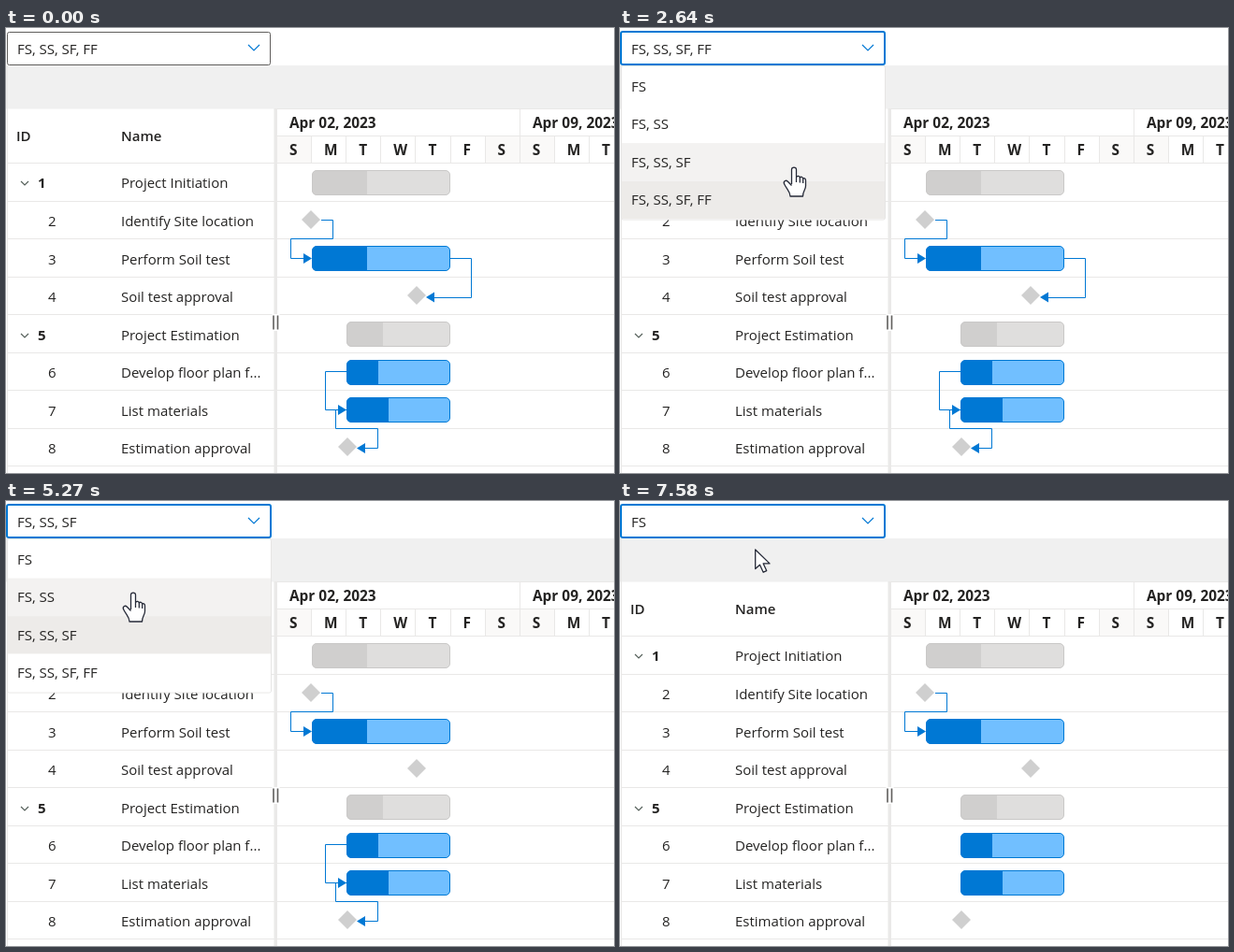
Write an HTML page that moves like this. It is 650 by 476 pixels and loops after 8000 ms.

```html
<!DOCTYPE html>
<html lang="en">
<head>
<meta charset="utf-8">
<title>Gantt dependency types</title>
<style>
  html, body { margin: 0; width: 100%; height: 100%; overflow: hidden; background: #fff; }
  svg { display: block; width: 650px; height: 476px; }
  text { font: 15px "Open Sans", "Noto Sans", sans-serif; fill: #242322; white-space: pre; }
  .head { font-weight: 600; }
  .date { font-weight: 700; font-size: 15.4px; }
  .bold { font-weight: 700; }
  .line { fill: none; stroke: #e9e8e7; }
  .link { fill: none; stroke: #0078d4; }
  .chevron { fill: none; stroke: #55605a; stroke-width: 1.2; }
  .pointer { fill: #fff; stroke: #262a38; stroke-width: 1.3; stroke-linejoin: round; }
  #click { fill: #fcf472; mix-blend-mode: multiply; }
</style>
</head>
<body>
<svg id="stage" viewBox="0 0 650 476"></svg>
<script>
const LOOP = 8000, ROW = 40.55, TOP = 144, DAY = 37.1, CHART = 290;
const OPTIONS = ['FS', 'FS, SS', 'FS, SS, SF', 'FS, SS, SF, FF'];
const TASKS = [
  ['1', 'Project Initiation'], ['2', 'Identify Site location'],
  ['3', 'Perform Soil test'], ['4', 'Soil test approval'],
  ['5', 'Project Estimation'], ['6', 'Develop floor plan f...'],
  ['7', 'List materials'], ['8', 'Estimation approval']
];

const text = (x, y, s, cls = '') => `<text x="${x}" y="${y}" class="${cls}">${s}</text>`;
const rect = (x, y, w, h, fill, more = '') =>
  `<rect x="${x}" y="${y}" width="${w}" height="${h}" fill="${fill}" ${more}/>`;
const path = (d, cls, more = '') => `<path d="${d}" class="${cls}" ${more}/>`;
const rowY = (i, offset = 0) => Math.round(TOP + i * ROW + offset);
const rowLine = i => path(`M1 ${rowY(i) + 0.5}H650`, 'line');

function bar(row, x, progress, parent) {
  const y = rowY(row, 7.95) + 0.5, left = x + 0.5, w = 474.5 - left;
  const [back, done, edge] = parent
    ? ['#dfdedd', '#d0cfce', '#c9c8c7'] : ['#71bfff', '#0078d4', '#0078d4'];
  return rect(left, y, w, 26, back, 'rx="4.5"') +
    path(`M${progress} ${y}H${left + 4.5}q-4.5 0-4.5 4.5v17q0 4.5 4.5 4.5H${progress}z`, '', `fill="${done}"`) +
    rect(left, y, w, 26, 'none', `rx="4.5" stroke="${edge}"`);
}

const diamond = (x, y) => path(`M${x} ${y - 10}l10 10-10 10-10-10z`, '', 'fill="#cfcfcf"');

// dir is 1 for an arrow pointing right, -1 for left
const link = (id, d, x, y, dir) => `<g id="${id}">${path(d, 'link')}
  ${path(`M${x} ${y}l${-9 * dir}-5.5v11z`, '', 'fill="#0078d4"')}</g>`;

function grid() {
  let s = rect(0, 40, 650, 46.5, '#f0f0f0') + path('M1.5 40V476', 'line');
  s += text(11, 121, 'ID', 'head') + text(123, 121, 'Name', 'head');
  TASKS.forEach(([id, name], i) => {
    const y = rowY(i, 27.45), parent = id === '1' || id === '5';
    s += rowLine(i);
    if (parent) s += path(`M16 ${y - 7}l4 4 4-4`, 'chevron');
    s += text(parent ? 34 : 45, y, id, parent ? 'bold' : '') + text(123, y, name);
  });
  return s + rowLine(TASKS.length);
}

function chart() {
  let s = '';
  [...'SMTWTFSSMT'].forEach((day, i) => {
    const x = CHART + i * DAY;
    if (day === 'S') s += rect(x, 116, DAY, 28, '#faf9f8');
    if (i) s += path(`M${Math.round(x) - 0.5} 115V144`, 'line');
    s += text(x + 13, 136, day, 'date');
  });
  s += path('M290 86.5H650M290 115.5H650M549.5 86V115', 'line');
  s += text(303, 107, 'Apr 02, 2023', 'date') + text(563, 107, 'Apr 09, 2023', 'date');
  s += bar(0, 327, 386, true) + bar(2, 327, 386) + bar(4, 364, 403, true) +
    bar(5, 364, 398) + bar(6, 364, 409);
  s += diamond(326, 205) + diamond(439, 286) + diamond(365, 448);
  s += link('fs', 'M337 205.5H349.5V225.5H304.5V246.5H319', 327, 246.5, 1);
  s += link('ss', 'M364 367.5H341.5V408.5H356', 364, 408.5, 1);
  s += link('sf', 'M364 408.5H352.5V428.5H397.5V449.5H383', 375, 449.5, -1);
  s += link('ff', 'M475 246.5H497.5V288.5H457', 449, 288, -1);
  s += rect(286.5, 86, 3.5, 390, '#eae9e8') + rect(284.5, 306, 8, 18, '#fff');
  return s + path('M286 307.5V322.5M290.5 307.5V322.5', '', 'stroke="#605e5c" stroke-width="1.6"');
}

function dropdown() {
  const items = OPTIONS.map((name, i) =>
    rect(2, 42 + i * ROW, 281, ROW, '#fff', 'class="item"') +
    text(12, Math.floor(68 + i * ROW), name)).join('');
  return `<rect id="box" fill="#fff" rx="2"/>
    <text id="value" x="12" y="28"></text>
    ${path('M259 18l6 6 6-6', '', 'fill="none" stroke="#0078d4" stroke-width="1.2"')}
    <g id="popup">${rect(1.5, 40.5, 282, 164.5, '#fff', 'rx="2" stroke="#e6e5e4"')}${items}</g>`;
}

const HAND = 'M-2.5 18V2.6C-2.5-.6 2.5-.6 2.5 2.6V11C3.2 8.6 6.3 8.8 6.3 11.5' +
  'C7 9.6 9.6 9.9 9.7 12.5C10.5 11 12.5 11.6 12.5 14V20C12.5 24 9.5 25.5 9.5 31H-4' +
  'C-4 26-7 24.5-10.2 18.2C-12 14.8-8.6 13.2-6.6 15.2L-2.5 19.5M2.5 11V16M6.3 11.5V16.5M9.7 12.5V17';
const ARROW = 'M.7 1V21.5L5.5 17.2 9.2 25.2 12.7 23.6 9.2 15.9H16Z';

document.getElementById('stage').innerHTML = grid() + chart() + dropdown() +
  path(HAND, 'pointer', 'id="hand"') + path(ARROW, 'pointer', 'id="arrow"') +
  '<circle id="click" r="18"/>';

const $ = id => document.getElementById(id);
const items = [...document.querySelectorAll('.item')];
const show = (id, on) => $(id).setAttribute('visibility', on ? 'visible' : 'hidden');

// start, end, pointer target, number of steps
const MOVES = [
  [1070, 1700, 182, 20, 9], [2500, 2640, 186, 149, 3], [3910, 4260, 150, 20, 6],
  [4930, 5270, 136, 98, 5], [6140, 6360, 136, 21, 4], [6770, 7040, 144, 51, 4]
];
const POPUP = [
  [0, 0], [1970, .25], [2040, .75], [2100, 1], [3110, .5], [3180, 0],
  [4460, .25], [4530, .75], [4600, 1], [5670, .5], [5740, 0],
  [6560, .25], [6630, .75], [6700, 1], [7510, .5], [7580, 0]
];
const VALUE = [[0, 3], [3110, 2], [5670, 1], [7510, 0]];
const CLICKS = [[1900, 2040], [3040, 3180], [4390, 4530], [5600, 5740], [6560, 6630], [7440, 7580]];

const at = (table, t) => table.filter(([start]) => start <= t).pop()[1];

function pointerAt(t) {
  let x = 437, y = 338;
  for (const [start, end, toX, toY, count] of MOVES) {
    if (t < start) break;
    const first = start === 1070 ? 0 : 1;
    const gap = (end - start) / (count - first);
    const step = Math.min(count, first + Math.floor((t - start) / gap + 1e-6));
    const p = step / count, ease = p * p * (3 - 2 * p);
    x += (toX - x) * ease;
    y += (toY - y) * ease;
  }
  return [x, y];
}

function render(t) {
  const [x, y] = pointerAt(t), open = at(POPUP, t), value = at(VALUE, t);
  const useHand = (x < 284 && y < 40) || open > 0;
  const hover = open === 1 ? Math.floor((y - 42) / ROW) : -1;
  const box = t >= 1900 ? [1, 4, 282, 35, '#0078d4', 2] : [1.5, 4.5, 281, 35, '#605e5c', 1];

  ['x', 'y', 'width', 'height', 'stroke', 'stroke-width']
    .forEach((name, i) => $('box').setAttribute(name, box[i]));
  $('value').textContent = OPTIONS[value];
  $('popup').setAttribute('opacity', open);
  items.forEach((item, i) => item.setAttribute('fill',
    i === value ? '#edebe9' : i === hover ? '#f3f2f1' : '#fff'));
  ['fs', 'ss', 'sf', 'ff'].forEach((id, i) => show(id, i <= value));

  show('click', CLICKS.some(([start, end]) => t >= start && t < end));
  show('hand', t >= 1070 && useHand);
  show('arrow', t >= 1070 && !useHand);
  for (const id of ['click', 'hand', 'arrow'])
    $(id).setAttribute('transform', `translate(${x} ${y})`);
}

const begin = performance.now();
function frame() {
  render((performance.now() - begin) % LOOP);
  requestAnimationFrame(frame);
}
frame();
</script>
</body>
</html>
```
